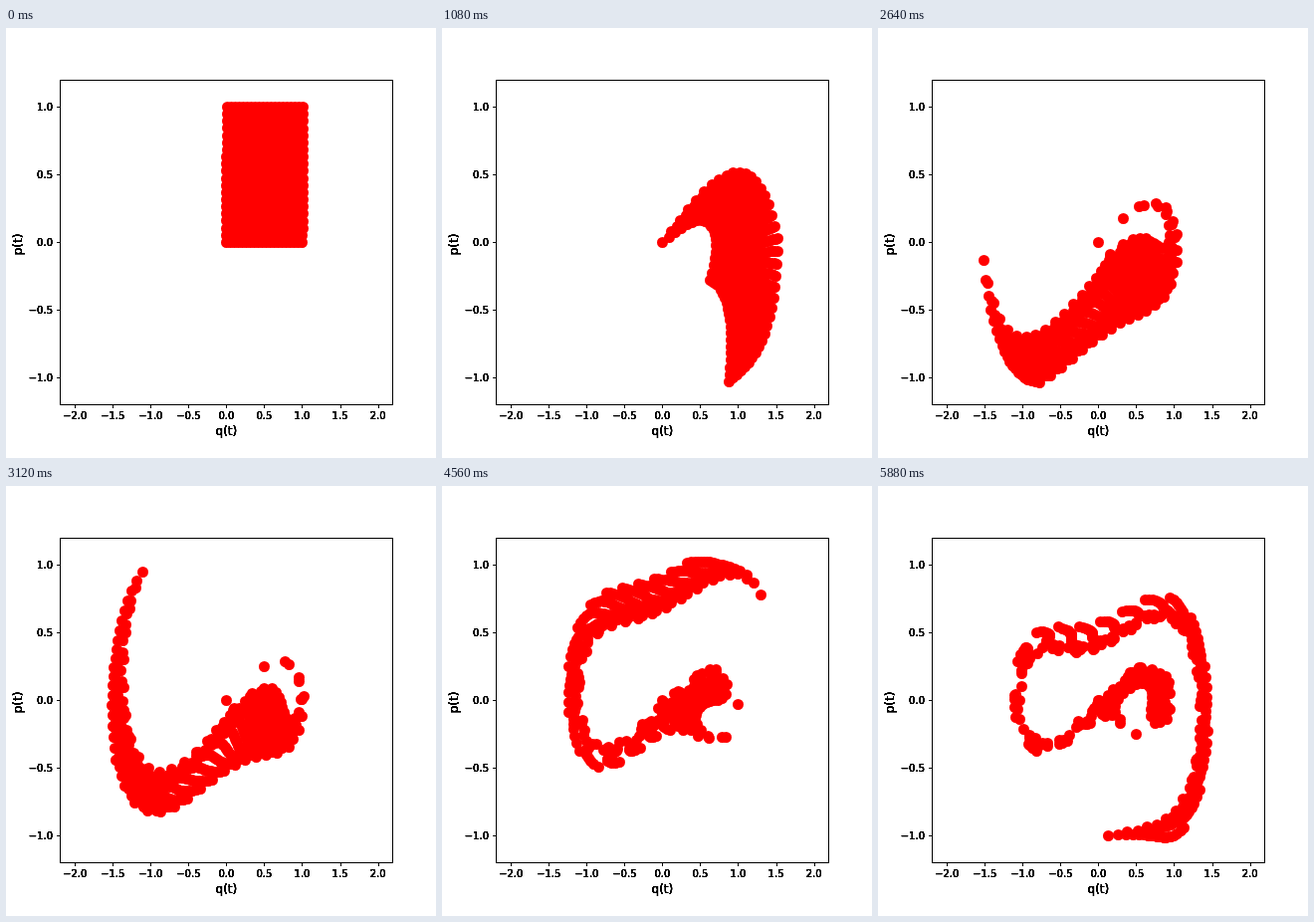
An HTML page with a canvas that plays this animation: 432 px wide and 432 px high, repeating every 6000 ms.

```html
<!DOCTYPE html>
<html lang="en">
<head>
<meta charset="utf-8">
<title>Phase space flow</title>
<style>
html, body { margin: 0; overflow: hidden; background: #fff; }
canvas { display: block; }
</style>
</head>
<body>
<canvas id="stage" width="432" height="432"></canvas>
<script>
const ctx = document.getElementById('stage').getContext('2d');
const FRAMES = 50, HOLD = 120, SIDE = 20, DT = 0.001, STEPS = 100;
const toX = q => 221.4 + q * 334.8 / 4.4;
const toY = p => 214.92 - p * 135.9;
const snap = v => Math.floor(v + 0.5) + 0.5;

// Flow of H = p² + (q⁴ - q²) / 3, symplectic Euler keeps the energy
function advance(points, steps) {
  return points.map(([q, p]) => {
    for (let i = 0; i < steps; i++) {
      q += 2 * p * DT;
      p += (2 * q - 4 * q * q * q) / 3 * DT;
    }
    return [q, p];
  });
}

const grid = Array.from({ length: SIDE * SIDE }, (_, i) =>
  [(i % SIDE) / (SIDE - 1), Math.floor(i / SIDE) / (SIDE - 1)]);
const states = [advance(grid, 1)];
while (states.length < FRAMES) states.push(advance(states.at(-1), STEPS));

function label(text, x, y, size, align, angle = 0) {
  ctx.save();
  ctx.translate(x, y);
  ctx.rotate(angle);
  ctx.font = size + 'px "DejaVu Sans", sans-serif';
  ctx.textAlign = align;
  // Repeated passes give the heavy edges of the lettering
  for (let i = 0; i < 7; i++) ctx.fillText(text, 0, 0);
  ctx.restore();
}

function line(x1, y1, x2, y2) {
  ctx.beginPath();
  ctx.moveTo(x1, y1);
  ctx.lineTo(x2, y2);
  ctx.stroke();
}

function drawAxes() {
  ctx.fillStyle = ctx.strokeStyle = '#000';
  ctx.lineWidth = 1;
  ctx.strokeRect(54.5, 52.5, 334, 326);
  const name = v => v.toFixed(1).replace('-', '\u2212');
  for (let v = -2; v <= 2; v += 0.5) {
    const x = snap(toX(v)), y = snap(toY(v));
    line(x, 378.5, x, 382);
    label(name(v), toX(v), 393, 10, 'center');
    if (Math.abs(v) > 1) continue;
    line(51, y, 54.5, y);
    label(name(v), 47, Math.round(toY(v) + 4), 10, 'right');
  }
  label('q(t)', 221.4, 409, 12, 'center');
  label('p(t)', 16, 217.5, 12, 'center', -Math.PI / 2);
}

function draw(points) {
  ctx.fillStyle = '#fff';
  ctx.fillRect(0, 0, 432, 432);
  ctx.fillStyle = '#f00';
  for (const [q, p] of points) {
    ctx.beginPath();
    ctx.arc(snap(toX(q)), snap(toY(p)), 5.5, 0, 2 * Math.PI);
    ctx.fill();
  }
  drawAxes();
}

const start = performance.now();
function tick() {
  const n = Math.floor((performance.now() - start) / HOLD) % FRAMES;
  draw(states[n]);
  requestAnimationFrame(tick);
}
tick();
</script>
</body>
</html>
```
